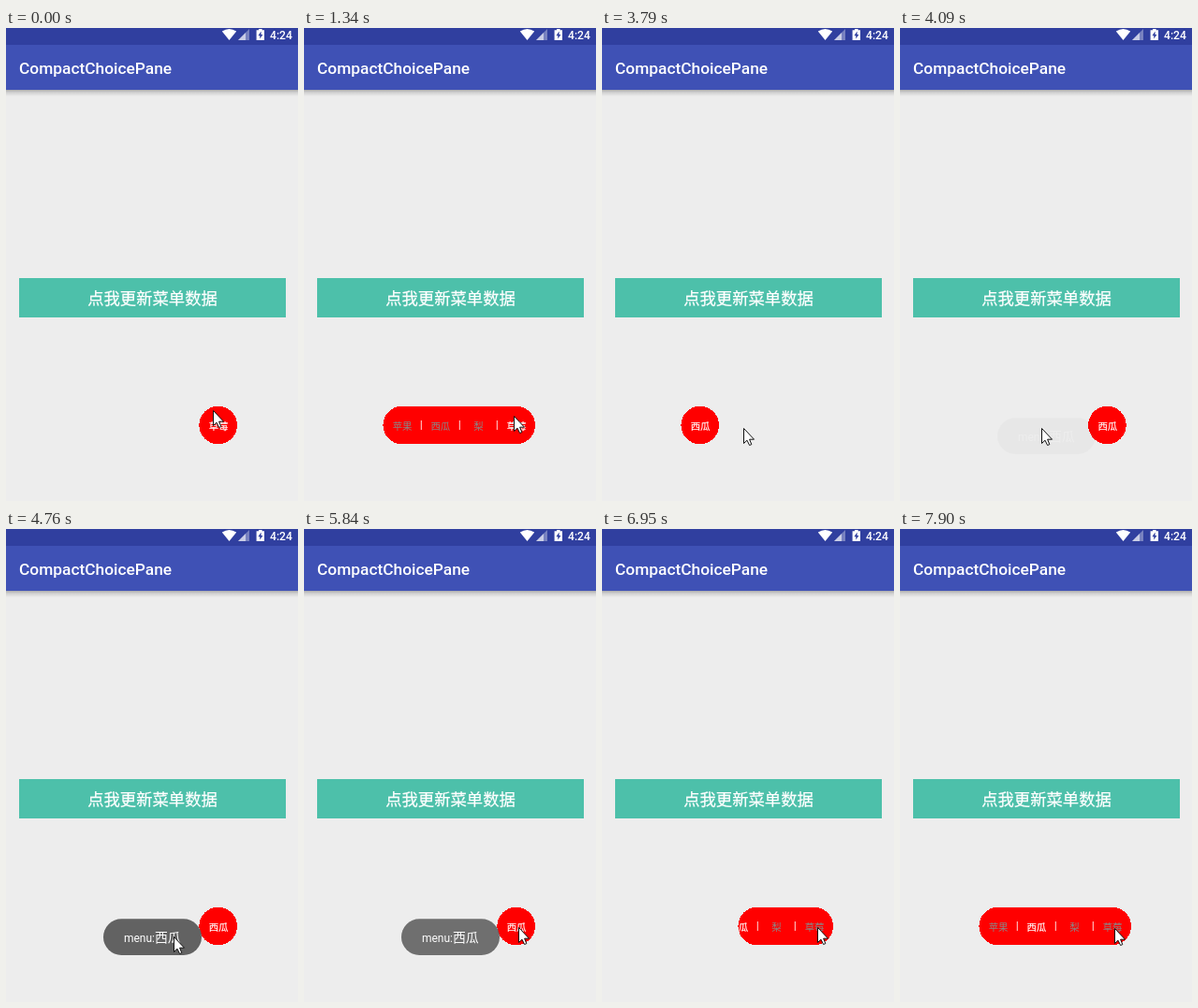
Recreate the animation shown at these times as an HTML page. Size 312 by 505 pixels, loop 8 s.

```html
<!DOCTYPE html>
<html lang="zh-CN">
<head>
<meta charset="utf-8">
<title>Menu</title>
<style>
  html, body { margin: 0; width: 100%; height: 100%; overflow: hidden; background: #ededed; }
  svg { display: block; width: 100%; height: 100%; }
  text { font-family: Roboto, "Noto Sans CJK SC", "Noto Sans CJK", sans-serif; fill: #fff; }
  .mid { text-anchor: middle; }
  .title { font-size: 17.33px; font-weight: 500; }
  .clock { font-size: 12.13px; font-weight: 500; }
  .button { font-size: 17.33px; stroke: #fff; stroke-width: .25; }
  .item { font-size: 10.4px; }
  .white { stroke: #fff; stroke-width: .2; }
  .grey { fill: #888; }
  .toast { font-size: 13.87px; }
  .toast .latin { font-size: 12px; }
  .pill { shape-rendering: crispEdges; }
</style>
</head>
<body>
<svg viewBox="0 0 312 505">
  <defs>
    <linearGradient id="shade" x2="0" y2="1">
      <stop offset="0" stop-opacity=".27"/>
      <stop offset=".4" stop-opacity=".12"/>
      <stop offset="1" stop-opacity="0"/>
    </linearGradient>
    <clipPath id="pillClip"><rect class="pill" y="403.7" height="40.6" rx="20.3"/></clipPath>
  </defs>

  <rect width="312" height="505" fill="#ededed"/>
  <rect y="66" width="312" height="7" fill="url(#shade)"/>
  <rect width="312" height="66" fill="#3f51b5"/>
  <rect width="312" height="18" fill="#303f9f"/>

  <g fill="#fff">
    <path d="M238.5 13 230.8 3.6Q238.5 -1.8 246.2 3.6Z"/>
    <path d="M260 1V13H248Z" opacity=".35"/>
    <path d="M256 5V13H248Z" opacity=".6"/>
    <path fill-rule="evenodd" d="M270 1h3.6v1.2H276V13h-8.4V2.2H270ZM272.6 3.6 269.4 8.2H271.3V11.6L274.4 7H272.6Z"/>
  </g>
  <text class="clock" x="282" y="12.2">4:24</text>
  <text class="title" x="14" y="48.6">CompactChoicePane</text>

  <rect x="14" y="267" width="285" height="42" fill="#4dc0aa"/>
  <text class="button mid" x="156.5" y="295">点我更新菜单数据</text>

  <rect class="pill" y="403.7" height="40.6" rx="20.3" fill="#f00"/>
  <g id="items" clip-path="url(#pillClip)"></g>
  <text id="label" class="item white mid" y="428.6"></text>

  <g id="toast">
    <rect x="104" y="416.3" width="105" height="38.7" rx="19.35" fill="#626262"/>
    <text class="toast mid" x="156.3" y="440.6"><tspan class="latin">menu:</tspan>西瓜</text>
  </g>

  <path id="cursor" d="M.5 .5V16.5L4 13.2 6.6 18.5 8.8 17.6 6.6 12.2H11.5Z" fill="#fff" stroke="#111" stroke-linejoin="round"/>
</svg>

<script>
const LOOP = 8000, REFRESH = 130;
const OPEN = 1070, PICK = 3790, REOPEN = 6820;
const LEFT = 84.4, RIGHT = 247, CELL = (RIGHT - LEFT) / 4, HOME = RIGHT - CELL;
const NAMES = ['苹果', '西瓜', '梨', '草莓'];

// The screen refreshes in bursts of activity, at a steady rate within each.
const BURSTS = [0, OPEN, 2080, PICK, 4760, REOPEN];

// Pointer path as [time, x, y].
const PATH = [
  [0, 221, 408], [260, 224, 414], [2000, 224, 414], [2470, 172, 433], [2600, 161, 433],
  [3110, 151, 427], [4640, 151, 427], [4760, 179, 435], [5020, 221, 432],
  [5960, 231, 424], [7860, 229, 426], [LOOP, 229, 426]
];

const $ = id => document.getElementById(id);
const mix = (a, b, k) => a + (b - a) * k;
const progress = (t, start, length) => Math.min(1, Math.max(0, (t - start) / length));
const ease = k => (1 - Math.cos(Math.PI * k)) / 2;

function refreshed(t) {
  const start = BURSTS.findLast(burst => burst <= t);
  return t - (t - start) % REFRESH;
}

function add(parent, tag, attrs, text = '') {
  const el = document.createElementNS('http://www.w3.org/2000/svg', tag);
  for (const key in attrs) el.setAttribute(key, attrs[key]);
  el.textContent = text;
  return parent.appendChild(el);
}

const items = NAMES.map((name, i) => {
  const x = LEFT + CELL * i;
  if (i) add($('items'), 'rect', { x: Math.round(x) - .2, y: 419, width: 1, height: 10, fill: '#fff', opacity: .85 });
  return add($('items'), 'text', { x: x + CELL / 2 + .4, y: 428.6 }, name);
});

function pointerAt(t) {
  const next = PATH.findIndex(point => point[0] > t);
  const [from, x0, y0] = PATH[next - 1], [to, x1, y1] = PATH[next];
  const k = progress(t, from, to - from);
  return [mix(x0, x1, k), mix(y0, y1, k)].map(Math.round);
}

function pillAt(t) {
  if (t >= PICK && t < REOPEN) {
    const x = mix(LEFT, HOME, ease(progress(t, PICK, 300)));
    return { x, width: CELL, open: false };
  }
  const start = t < PICK ? OPEN : REOPEN;
  const x = mix(HOME, LEFT, ease(progress(t, start, 2 * REFRESH)));
  return { x, width: RIGHT - x, open: t >= start };
}

function draw(t) {
  const { x, width, open } = pillAt(t);
  const selected = t < PICK ? 3 : 1;
  for (const el of document.querySelectorAll('.pill')) {
    el.setAttribute('x', x);
    el.setAttribute('width', width);
  }
  $('items').style.display = open ? '' : 'none';
  items.forEach((el, i) => el.setAttribute('class', `item mid ${i === selected ? 'white' : 'grey'}`));
  $('label').textContent = open ? '' : NAMES[selected];
  $('label').setAttribute('x', x + CELL / 2 + .4);
  $('toast').style.opacity = progress(t, 4040, 270) - progress(t, 5760, 430);
  $('cursor').setAttribute('transform', `translate(${pointerAt(t)})`);
}

const begin = performance.now();
function tick() {
  draw(refreshed(Math.max(0, performance.now() - begin) % LOOP));
  requestAnimationFrame(tick);
}
tick();
</script>
</body>
</html>
```
